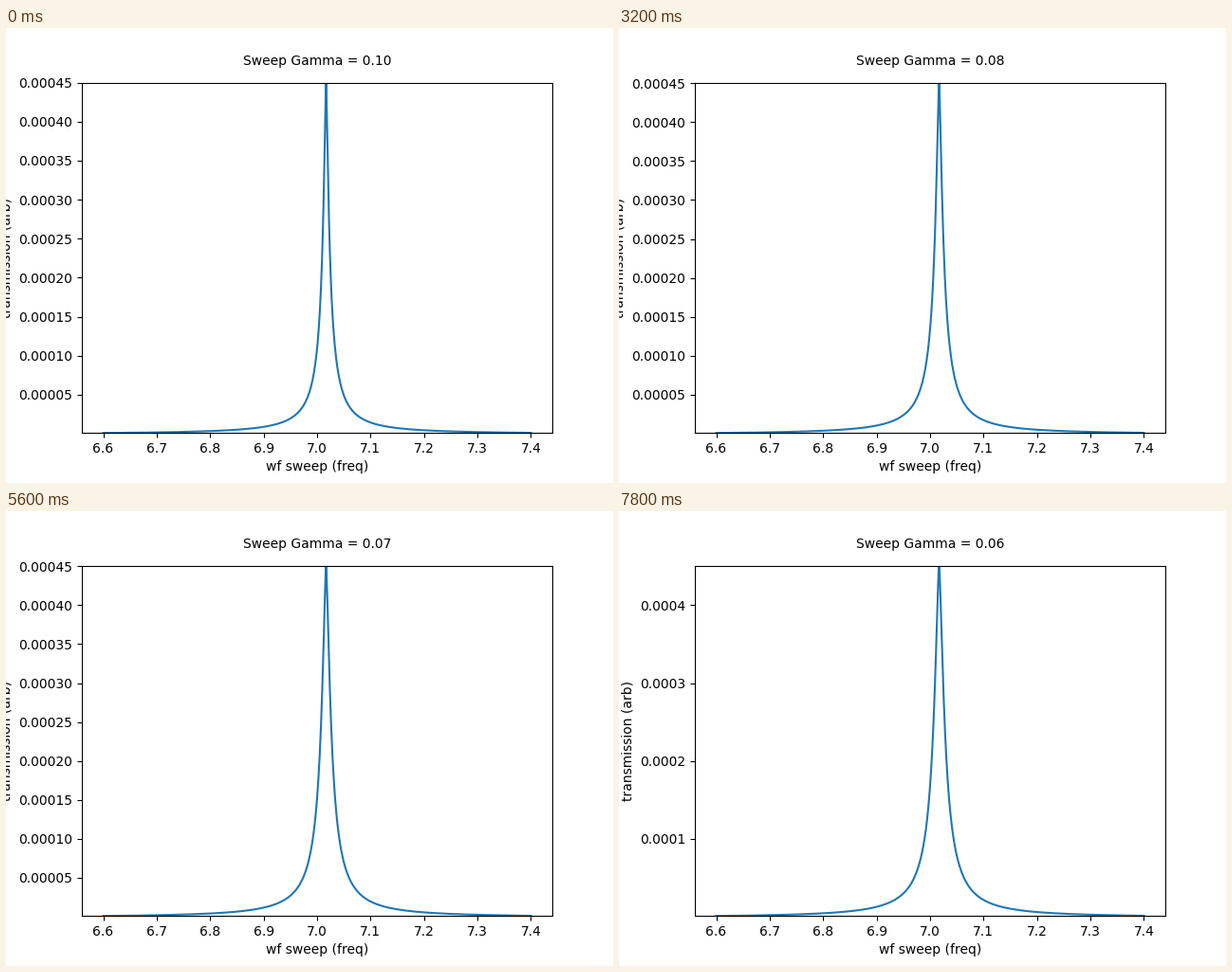
A matplotlib script for the animation above (8 s loop, 640 px wide and 480 px high).

```python
import numpy as np
import matplotlib.pyplot as plt
from matplotlib.animation import FuncAnimation
from matplotlib.ticker import MultipleLocator

FRAMES = 40
INTERVAL = 200
COARSE_FROM = 38          # range outgrows nine fine tick steps here
PIXEL = 1.2172e-6         # transmission per vertical pixel
Y_MIN = 0.81 * PIXEL
CENTER = 7.0168

gammas = np.linspace(0.1, 0, 100)
freq = np.linspace(6.6, 7.4, 1001)


def top_limit(k):
    """Peak height: rises a little above 0.00045 and settles."""
    left = 1 - k / (FRAMES - 1)
    return 0.00045 + (0.81 - 0.79 * left ** 2) * PIXEL


def transmission(k, y_max):
    u = k / (FRAMES - 1)
    width = 0.0075 + 0.0045 * u
    power = 1.4 + 0.12 * u
    shape = 1 / (1 + (np.abs(freq - CENTER) / width) ** power)
    shape = (shape - shape.min()) / (shape.max() - shape.min())
    return Y_MIN + (y_max - Y_MIN) * shape


fig, ax = plt.subplots(figsize=(6.4, 4.8), dpi=100)
line, = ax.plot([], [], color="C0", lw=1.5)
title = ax.text(0.5, 1.05, "", transform=ax.transAxes, ha="center", fontsize=10)
ax.set_xlim(6.56, 7.44)
ax.xaxis.set_major_locator(MultipleLocator(0.1))
ax.set_xlabel("wf sweep (freq)")
ax.set_ylabel("transmission (arb)")
ax.ticklabel_format(axis="y", style="plain", useOffset=False)


def update(k):
    y_max = top_limit(k)
    ax.set_ylim(Y_MIN, y_max)
    step = 0.0001 if k >= COARSE_FROM else 0.00005
    ax.yaxis.set_major_locator(MultipleLocator(step))
    line.set_data(freq, transmission(k, y_max))
    title.set_text(f"Sweep Gamma = {gammas[k]:.2f}")
    return line, title


anim = FuncAnimation(fig, update, frames=FRAMES, interval=INTERVAL,
                     repeat=True, repeat_delay=0, blit=False)
plt.show()
```
